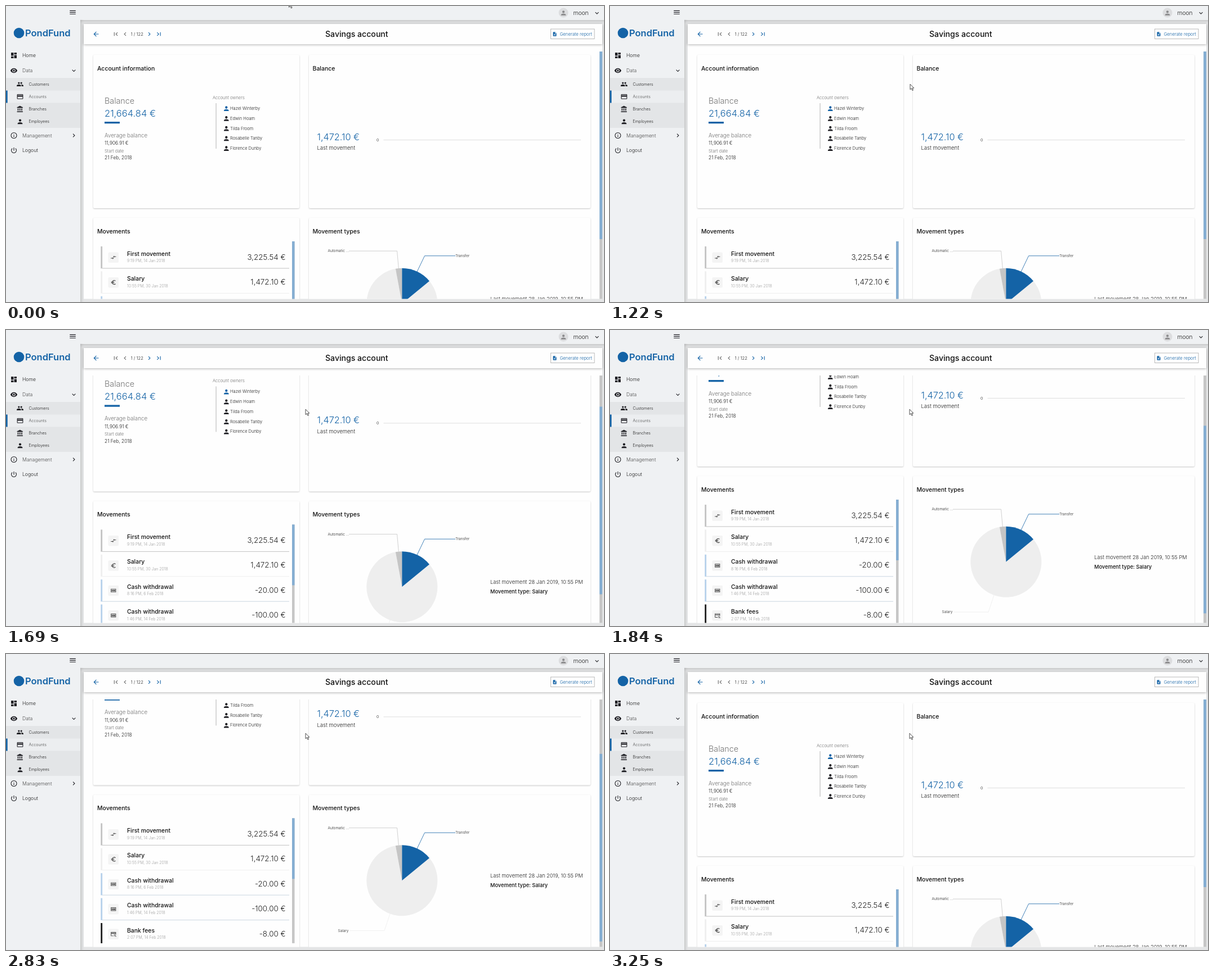
An HTML page that plays this animation: 1062x527 px, repeating every 4.38 s.

```html
<!DOCTYPE html>
<html lang="en">
<head>
<meta charset="utf-8">
<title>Savings account</title>
<style>
  html, body { margin: 0; width: 100%; height: 100%; overflow: hidden; background: #e4e5e6; }
  svg { display: block; width: 1062px; height: 527px; }
  text { font-family: Inter, "Open Sans", sans-serif; font-weight: 300; fill: #1f1f1f; white-space: pre; }
  .bold { font-weight: 500; fill: #111; }
  .brand { font-weight: 600; }
  .blue { fill: #1463a6; }
  .grey { fill: #727272; }
  .pale { fill: #9c9c9c; }
  .mid { fill: #4c4c4c; }
  .end { text-anchor: end; }
  .card, .panel, .bar { fill: #fefefe; }
  .card { filter: drop-shadow(0 1.5px 1.3px rgba(0,0,0,.22)); }
  .bar { filter: drop-shadow(0 1px 2px rgba(0,0,0,.3)); }
  .shade { fill: #eff1f3; filter: drop-shadow(0 0 3px rgba(0,0,0,.26)); }
  .thumb { fill: #85aed2; }
  .track { fill: #c6c6c6; }
</style>
</head>
<body>
<svg id="stage" viewBox="0 0 1062 527"></svg>
<script>
const LOOP = 4380, BLUE = '#1463a6', INK = '#1f1f24', MAX_SCROLL = 139.3;

const ICONS = {
  home: 'M3 13h8V3H3zM3 21h8v-6H3zM13 21h8V11h-8zM13 3v6h8V3z',
  eye: 'M12 4.5C7 4.5 2.73 7.61 1 12c1.73 4.39 6 7.5 11 7.5s9.27-3.11 11-7.5c-1.73-4.39-6-7.5-11-7.5zM12 17a5 5 0 1 1 0-10 5 5 0 0 1 0 10zm0-8a3 3 0 1 0 0 6 3 3 0 0 0 0-6z',
  people: 'M16 11a3 3 0 1 0 0-6 3 3 0 0 0 0 6zM8 11a3 3 0 1 0 0-6 3 3 0 0 0 0 6zM8 13c-2.33 0-7 1.17-7 3.5V19h14v-2.5C15 14.17 10.33 13 8 13zM16 13l-.97.05C16.2 13.9 17 15 17 16.5V19h6v-2.5C23 14.17 18.33 13 16 13z',
  card: 'M20 4H4a2 2 0 0 0-2 2v12a2 2 0 0 0 2 2h16a2 2 0 0 0 2-2V6a2 2 0 0 0-2-2zm0 14H4v-6h16zm0-10H4V6h16z',
  branch: 'M4 10v7h3v-7zM10 10v7h3v-7zM2 22h19v-3H2zM16 10v7h3v-7zM11.5 1L2 6v2h19V6z',
  person: 'M12 12a4 4 0 1 0 0-8 4 4 0 0 0 0 8zm0 2c-2.67 0-8 1.34-8 4v2h16v-2c0-2.66-5.33-4-8-4z',
  info: 'M11 7h2v2h-2zM11 11h2v6h-2zM12 2a10 10 0 1 0 0 20 10 10 0 0 0 0-20zm0 18a8 8 0 1 1 0-16 8 8 0 0 1 0 16z',
  power: 'M13 3h-2v10h2zM17.83 5.17l-1.42 1.42A7 7 0 1 1 7.58 6.58L6.17 5.17a9 9 0 1 0 11.66 0z',
  file: 'M14 2H6a2 2 0 0 0-2 2v16a2 2 0 0 0 2 2h12a2 2 0 0 0 2-2V8zM16 18H8v-2h8zM16 14H8v-2h8zM13 9V3.5L18.5 9z',
  back: 'M20 11H7.83l5.59-5.59L12 4l-8 8 8 8 1.41-1.41L7.83 13H20z',
  first: 'M18.41 16.59L13.82 12l4.59-4.59L17 6l-6 6 6 6zM6 6h2v12H6z',
  left: 'M15.41 7.41L14 6l-6 6 6 6 1.41-1.41L10.83 12z',
  right: 'M10 6L8.59 7.41 13.17 12l-4.58 4.59L10 18l6-6z',
  last: 'M5.59 7.41L10.18 12l-4.59 4.59L7 18l6-6-6-6zM16 6h2v12h-2z',
  down: 'M16.59 8.59L12 13.17 7.41 8.59 6 10l6 6 6-6z',
  menu: 'M3 18h18v-2H3zM3 13h18v-2H3zM3 8h18V6H3z',
  swap: 'M9 14H2v2h7v3l4-4-4-4zM15 13v-3h7V8h-7V5l-4 4z',
  euro: 'M15 18.5c-2.51 0-4.68-1.42-5.76-3.5H15v-2H8.58a7 7 0 0 1 0-2H15V9H9.24A6.5 6.5 0 0 1 19.23 7.07L21 5.3A9 9 0 0 0 6.52 9H3v2h3.06a9 9 0 0 0 0 2H3v2h3.52A9 9 0 0 0 21 18.7l-1.78-1.77A6.4 6.4 0 0 1 15 18.5z',
  cash: 'M2 5h20v14H2zM4 7v10h16V7zM5 9h4v6H5zM10 9h4v6h-4zM15 9h4v6h-4z',
  fee: 'M2 4h20v9h-2v-2H4v7h9v2H2zM4 6v2h16V6zM15 21l6-7 1 1-6 7zM14.5 14h3v3h-3zM19.5 19h3v3h-3z'
};

const text = (x, y, size, str, cls = '') =>
  `<text x="${x}" y="${y}" font-size="${size}" class="${cls}">${str}</text>`;
const rect = (x, y, w, h, fill, extra = '') =>
  `<rect x="${x}" y="${y}" width="${w}" height="${h}" fill="${fill}" ${extra}/>`;
const box = (x, y, w, h, cls, extra = '') =>
  `<rect x="${x}" y="${y}" width="${w}" height="${h}" class="${cls}" ${extra}/>`;
const line = (points, color) =>
  `<polyline points="${points}" fill="none" stroke="${color}" stroke-width=".8"/>`;
const icon = (name, cx, cy, size = 13.3, fill = INK) =>
  `<path d="${ICONS[name]}" fill="${fill}" fill-rule="evenodd"
    transform="translate(${cx - size / 2} ${cy - size / 2}) scale(${size / 24})"/>`;

function sidebar() {
  const main = [['home', 'Home', 88], ['eye', 'Data', 115, 'mid'],
    ['info', 'Management', 230.5, 'mid'], ['power', 'Logout', 257]];
  const sub = [['people', 'Customers'], ['card', 'Accounts', 'mid'],
    ['branch', 'Branches'], ['person', 'Employees']];
  return box(0, -10, 132, 550, 'shade') + rect(0, 0, 132, 527, '#eff1f3') +
    icon('menu', 118.5, 11.3, 14) +
    `<circle cx="23" cy="48" r="9.3" fill="${BLUE}"/>` +
    text(34, 54, 16.5, 'PondFund', 'brand blue') +
    rect(0, 128, 132, 89, '#e3e5e7') + rect(0, 150.5, 132, 22, '#eceef0') +
    rect(0, 150.5, 2.7, 22, BLUE) +
    main.map(([i, s, y, c]) => icon(i, 14, y) + text(29, y + 3, 8.6, s, c)).join('') +
    sub.map(([i, s, c], n) => icon(i, 25, 139.2 + n * 22.2, 13) +
      text(40.5, 141.7 + n * 22.2, 7.2, s, c)).join('') +
    icon('down', 120.5, 115, 13) + icon('right', 120.5, 230.5, 13);
}

function topBar() {
  return box(130, -10, 940, 35, 'shade') +
    `<circle cx="990" cy="12" r="8.5" fill="#dcdddf"/>` +
    icon('person', 990, 12.5, 13, '#8b8b8d') +
    text(1007.5, 15.5, 10.2, 'moon') + icon('down', 1049.5, 12.5, 13);
}

function titleBar() {
  return box(138, 32, 921, 36, 'bar') + icon('back', 160, 50, 13.5, BLUE) +
    icon('first', 195, 50, 13, '#666') + icon('left', 211.5, 50, 13, '#666') +
    text(221.5, 52.8, 7.7, '1 / 122') +
    icon('right', 254.5, 50, 13, BLUE) + icon('last', 271.5, 50, 13, BLUE) +
    text(567, 55, 14.1, 'Savings account', 'bold') +
    rect(967.5, 41, 77.5, 17.5, '#fff', 'stroke="#a9a9a9" stroke-width=".8"') +
    icon('file', 974.5, 50, 9, BLUE) + text(983.5, 52.6, 7.8, 'Generate report', 'blue');
}

function account() {
  const owners = ['Hazel Winterby', 'Edwin Hoam', 'Tilda Froom', 'Rosabelle Tanby', 'Florence Dunby'];
  return text(162, 114.7, 10.5, 'Account information', 'bold') +
    text(175, 173.5, 14.3, 'Balance', 'grey') +
    text(175, 196.7, 16.5, '21,664.84 €', 'blue') + rect(175, 206, 27, 3.3, BLUE) +
    text(175, 233.5, 9.8, 'Average balance', 'grey') +
    text(175, 247.2, 8.4, '11,906.91 €') +
    text(175, 260.6, 7.7, 'Start date', 'grey') +
    text(175, 273.2, 8.4, '21 Feb, 2018') +
    text(367, 166, 7.5, 'Account owners', 'grey') +
    rect(372.3, 173, 1.6, 81, '#cfcfcf') +
    owners.map((name, i) => icon('person', 391.3, 182.7 + i * 17.75, 13, i ? INK : BLUE) +
      text(398, 185 + i * 17.75, 7.5, name)).join('');
}

function balance() {
  return text(544.5, 114.7, 10.5, 'Balance', 'bold') +
    text(552.5, 238.7, 16.3, '1,472.10 €', 'blue') +
    text(552.5, 256.2, 9.5, 'Last movement') +
    text(658, 240.7, 6.8, '0') + rect(670.5, 238, 350.5, 1, '#dedede');
}

function movements() {
  const rows = [
    ['swap', 'First movement', '9:19 PM, 14 Jan 2018', '3,225.54 €', '#c2c2c2'],
    ['euro', 'Salary', '10:55 PM, 30 Jan 2018', '1,472.10 €', '#eee'],
    ['cash', 'Cash withdrawal', '8:16 PM, 6 Feb 2018', '-20.00 €', '#b5d0ea'],
    ['cash', 'Cash withdrawal', '1:46 PM, 14 Feb 2018', '-100.00 €', '#b5d0ea'],
    ['fee', 'Bank fees', '2:07 PM, 14 Feb 2018', '-8.00 €', '#1c1c1c']
  ];
  const row = ([i, name, when, sum, color], n) =>
    `<g transform="translate(0 ${n * 44.4})">` +
    rect(168.3, 428, 2.8, 39.3, color) + rect(171, 466.5, 332, 1, n > 1 ? '#cbd6e2' : color) +
    rect(181.5, 438.5, 18.5, 18.5, '#f4f4f4', 'rx="2"') + icon(i, 190.8, 447.7, 11, '#444') +
    text(215, 444.5, 10.4, name, 'bold') + text(215, 456.2, 6.9, when, 'pale') +
    text(496.5, 451.7, 13.4, sum, 'end') + '</g>';
  return text(162, 404.5, 10.5, 'Movements', 'bold') +
    `<g clip-path="url(#list)">${rows.map(row).join('')}</g>` +
    box(508, 419, 4.5, 222.5, 'track') + box(508, 419, 4.5, 108, 'thumb');
}

function pie() {
  const cx = 703.3, cy = 529.8, r = 63, turn = 50.5;
  const at = deg => {
    const a = deg * Math.PI / 180;
    return `${cx + r * Math.sin(a)} ${cy - r * Math.cos(a)}`;
  };
  const slice = (from, to, fill) =>
    `<path d="M${cx} ${cy}L${at(from)}A${r} ${r} 0 ${+(to - from > 180)} 1 ${at(to)}z" fill="${fill}"/>`;
  return text(544.5, 404.5, 10.5, 'Movement types', 'bold') +
    slice(turn, 349.5, '#eee') + slice(-10.5, 0, '#c5c5c5') + slice(0, turn, BLUE) +
    line('609,436.2 694.5,436.2 697.3,467', '#c5c5c5') +
    line('730,473 743.5,444.8 798,444.8', BLUE) +
    line('611,619.2 672,619.2 682,589', '#eee') +
    text(571.5, 438.2, 6.5, 'Automatic ...') + text(798, 446.7, 6.5, 'Transfer') +
    text(589.5, 621.2, 6.5, 'Salary') +
    text(860, 524.8, 9.2, 'Last movement 28 Jan 2019, 10:55 PM') +
    text(860, 541.7, 9.25, 'Movement type: Salary', 'bold');
}

const cards = [[155, 87, 366], [538, 87, 500], [155, 377, 366], [538, 377, 500]]
  .map(([x, y, w]) => box(x, y, w, 273, 'card', 'rx="2"')).join('');

document.getElementById('stage').innerHTML =
  `<clipPath id="view"><rect x="150" y="81" width="900" height="440.5"/></clipPath>
   <clipPath id="list"><rect x="160" y="419" width="346" height="222.5"/></clipPath>` +
  rect(0, 0, 1062, 527, '#e4e5e6') + topBar() + sidebar() +
  rect(132, 0, 20, 24.5, '#eff1f3') +
  box(138, 32, 921, 489.5, 'panel') +
  `<g clip-path="url(#view)"><g id="page">${cards}${account()}${balance()}${movements()}${pie()}</g></g>` +
  box(1054, 81, 5, 440.5, 'track') + box(1054, 81, 5, 334, 'thumb', 'id="thumb"') +
  titleBar() +
  `<path id="cursor" d="M0 0v9.5l2.2-2 1.7 3.7 1.6-.7-1.7-3.6h3z" fill="#fff" stroke="#222" stroke-width=".8"/>`;

// Held values: [time, value] pairs, each lasting until the next.
const scrollTrack = [[0, 0], [1480, 4], [1550, 19], [1620, 45], [1690, 72.6], [1760, 97],
  [1830, 117], [1900, 130], [1970, 137], [2040, MAX_SCROLL], [2830, 126.6], [2900, 101],
  [2980, 72], [3030, 50], [3100, 24], [3170, 7], [3250, 0]];
const held = (track, t) => track.findLast(([start]) => t >= start)[1];

// Share of a move done in n equal jumps, the first at `start`.
const jumps = (t, start, gap, n) =>
  Math.max(0, Math.min(n, Math.floor((t - start) / gap) + 1)) / n;

function pointer(t) {
  if (t >= 1480) return [532, 141.2];
  const p = jumps(t, 390, 70, 8), back = jumps(t, 950, 90, 4);
  const ease = (1 - Math.cos(Math.PI * p)) / 2;
  return [502.5 + 34.5 * ease - 4 * back, -7.3 + 141.5 * ease + 5 * back];
}

const [page, thumb, cursor] = ['page', 'thumb', 'cursor'].map(id => document.getElementById(id));
const move = (el, x, y) => el.setAttribute('transform', `translate(${x} ${y})`);

function draw() {
  const t = performance.now() % LOOP, scroll = held(scrollTrack, t);
  move(page, 0, -scroll);
  move(thumb, 0, scroll * 106.5 / MAX_SCROLL);
  move(cursor, ...pointer(t));
  requestAnimationFrame(draw);
}
draw();
</script>
</body>
</html>
```
